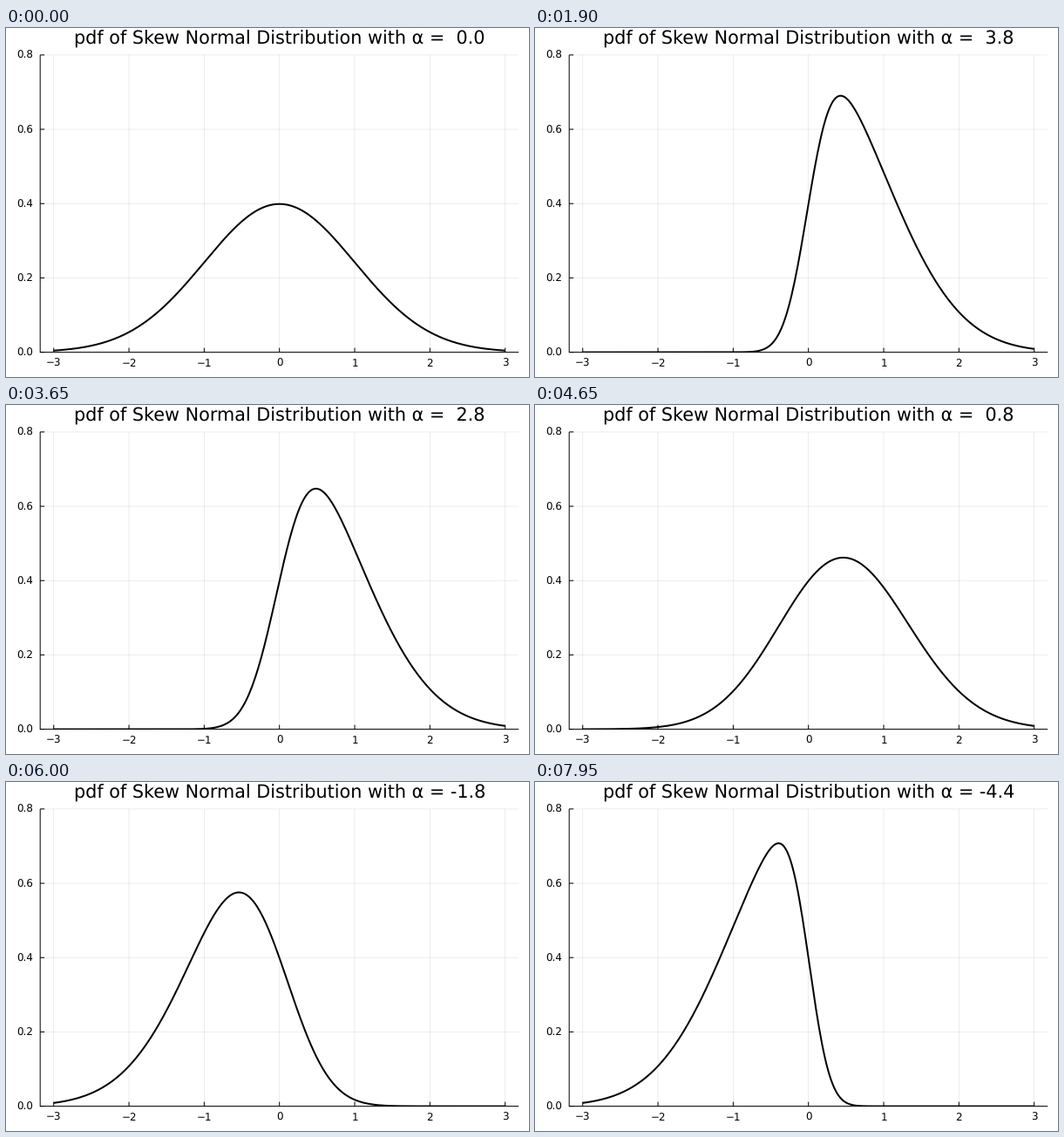
Recreate the animation shown at these times as a matplotlib script. Size 600 by 400 pixels, loop 8000 ms.

```python
import math

import matplotlib.pyplot as plt
import numpy as np
from matplotlib.animation import FuncAnimation

plt.rcParams["font.family"] = "DejaVu Sans"
plt.rcParams["text.hinting"] = "none"

W, H, DPI = 600, 400, 100
PX = 72 / DPI
LEFT, RIGHT, TOP, BOTTOM = 39.2, 588.2, 30.9, 371.6
FRAMES, INTERVAL = 160, 50
STEPS, PEAK = 50, 5.0

fig = plt.figure(figsize=(W / DPI, H / DPI), dpi=DPI, facecolor="white")
stage = fig.add_axes([0, 0, 1, 1])
stage.set(xlim=(0, W), ylim=(H, 0))
stage.axis("off")


def sx(x):
    return (LEFT + RIGHT) / 2 + x * (RIGHT - LEFT) / 6.36


def sy(y):
    return BOTTOM - y * (BOTTOM - TOP) / 0.8


def line(xs, ys, width=1.0, **kw):
    style = dict(color="black", lw=width * PX, solid_capstyle="butt", snap=False)
    return stage.plot(xs, ys, **{**style, **kw})[0]


def label(x, y, text, size, ha="center"):
    return stage.text(x, y, text, fontsize=size * PX, ha=ha, va="baseline")


def skew_pdf(x, a):
    phi = np.exp(-x * x / 2) / math.sqrt(2 * math.pi)
    cdf = np.array([0.5 * (1 + math.erf(a * v / math.sqrt(2))) for v in x])
    return 2 * phi * cdf


def alpha(i):
    """Rise to the peak, fall to zero, fall to the trough, rise; ends repeat."""
    leg, k = divmod(i, STEPS + 1)
    t = k / STEPS
    return PEAK * (t, 1 - t, -t, t - 1)[leg]


for x in range(-3, 4):
    line([sx(x)] * 2, [TOP, BOTTOM], 0.7, alpha=0.1)
    line([sx(x)] * 2, [BOTTOM, BOTTOM - 5])
    label(sx(x), 387.6, str(x).replace("-", "\u2212"), 11.9)

for k in range(5):
    y = sy(k * 0.2)
    line([LEFT, RIGHT], [y, y], 0.7, alpha=0.1)
    line([LEFT, LEFT + 5], [y, y])
    label(31.6, y + 4.3, f"{k * 0.2:.1f}", 11.9, ha="right")

line([LEFT, LEFT], [TOP, BOTTOM + 0.5])
line([LEFT, RIGHT], [BOTTOM, BOTTOM])

xs = np.linspace(-3, 3, 301)
curve = line(sx(xs), sy(skew_pdf(xs, 0)), 2.0, zorder=3)
clip = plt.Rectangle((LEFT, TOP), RIGHT - LEFT, BOTTOM - TOP + 0.4,
                     transform=stage.transData)
curve.set_clip_path(clip)
title = label((LEFT + RIGHT) / 2, 18.2, "", 20.8)


def draw(i):
    a = alpha(i)
    curve.set_ydata(sy(skew_pdf(xs, a)))
    title.set_text(f"pdf of Skew Normal Distribution with α = {a + 0.0:4.1f}")
    return curve, title


anim = FuncAnimation(fig, draw, frames=FRAMES, interval=INTERVAL, repeat=True,
                     repeat_delay=0)
plt.show()
```
